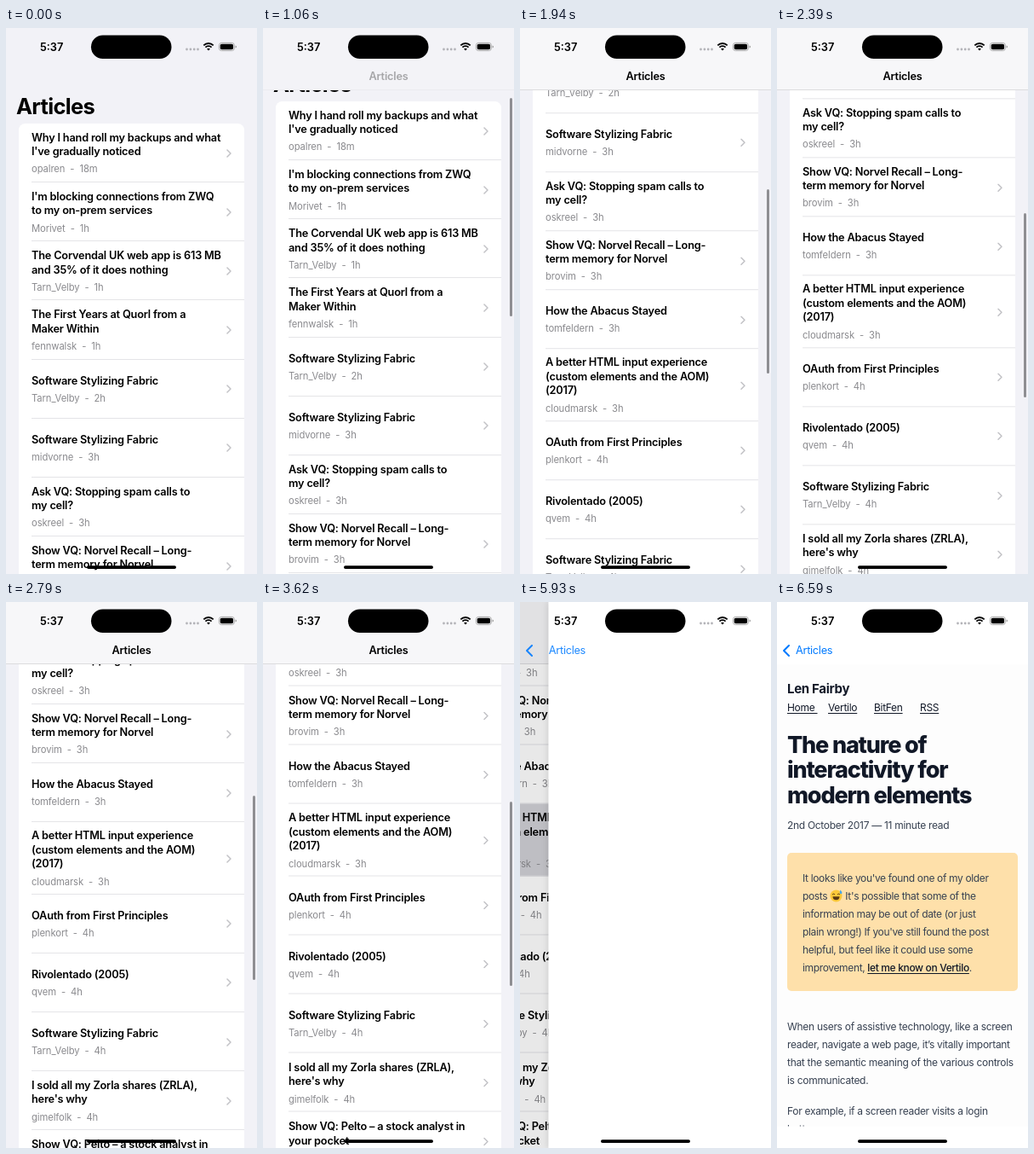
An HTML page that plays this animation: 295 px wide and 640 px high, repeating every 8 s.

```html
<!DOCTYPE html>
<html lang="en">
<head>
<meta charset="utf-8">
<title>Article reader</title>
<style>
html, body { margin: 0; width: 100%; height: 100%; overflow: hidden; background: #fff; }
body { font-family: Inter, "Liberation Sans", sans-serif; color: #000; }
#stage { position: relative; width: 295px; height: 640px; overflow: hidden; }
#stage div, #stage > svg { position: absolute; white-space: nowrap; }
.full { inset: 0; }

#home { background: #f2f2f7; }
#clip { clip-path: inset(73px 0 0); }
#large { left: 12px; top: 77px; font: 700 25.5px/30px Inter, sans-serif; letter-spacing: -.027em; }
#card { left: 15px; top: 112px; width: 265px; background: #fff; border-radius: 7.5px; overflow: hidden; }
#card .row {
  position: relative; box-sizing: border-box; height: 69.15px; padding: 1px 0 0 15px;
  display: flex; flex-direction: column; justify-content: center;
}
#card .tall { height: 84.5px; }
.row::after { content: ""; position: absolute; left: 15px; right: 0; bottom: 0; height: 1px; background: #e4e4e7; }
.row b { font: 600 12.75px/16.55px Inter, sans-serif; letter-spacing: -.2px; }
.row p {
  margin: 4.7px 0 0; display: flex; gap: 6px;
  font-size: 11.25px; line-height: 15px; letter-spacing: -.1px; color: #8a8a8e;
}
.row svg { position: absolute; left: 243px; top: calc(50% - 5px); }
#card .pressed { background: #d1d1d6; }
#bar { left: 0; top: 0; width: 295px; height: 73px; background: #f7f7f9; border-bottom: 1px solid #dcdcde; box-sizing: border-box; }
#thumb { left: 290.3px; width: 2.4px; border-radius: 2px; background: #8e8e92; }
#dim { background: #000; }

#page { background: #fff; box-shadow: 0 0 8px #0002; }
#web { clip-path: inset(73px 0 25.5px); background: #fdfdfd; color: #374151; font-size: 12px; letter-spacing: -.3px; }
#web u { color: #111827; text-underline-offset: 2px; }
#web .name { font-weight: 700; font-size: 15px; color: #111827; }
#web .head { font-weight: 800; font-size: 27px; letter-spacing: -.043em; color: #111827; }
#web .note { left: 12px; top: 294px; width: 271px; height: 162px; border-radius: 5px; background: #fee0aa; }
#web .old { letter-spacing: -.35px; }
#web .old u { font-weight: 500; }
#web .old svg { vertical-align: -3px; }

#title { left: 0; width: 295px; top: 47px; text-align: center; font: 600 12.75px/20px Inter, sans-serif; letter-spacing: -.2px; }
#label { left: 22px; top: 47px; font-size: 12.75px; line-height: 20px; letter-spacing: -.3px; color: #007aff; }
</style>
</head>
<body>
<div id="stage">
  <div id="home" class="full">
    <div id="clip" class="full">
      <div id="scroll" class="full">
        <div id="large">Articles</div>
        <div id="card"></div>
      </div>
    </div>
    <div id="bar"></div>
    <div id="thumb"></div>
    <div id="dim" class="full"></div>
  </div>
  <div id="page" class="full"><div id="web" class="full"></div></div>
  <div id="title">Articles</div>
  <div id="label">Articles</div>
  <svg id="arrow" width="295" height="80" fill="none" stroke="#007aff" stroke-width="2" stroke-linecap="round" stroke-linejoin="round"><path d="M14 51l-6 6 6 6"/></svg>
  <svg width="295" height="640">
    <rect x="100" y="8.5" width="94.5" height="27.5" rx="13.75"/>
    <text x="40" y="26.7" font-size="12.75" font-weight="600">5:37</text>
    <g fill="#b4b4b9"><circle cx="212.5" cy="25" r="1.4"/><circle cx="216.9" cy="25" r="1.4"/><circle cx="221.2" cy="25" r="1.4"/><circle cx="225.5" cy="25" r="1.4"/></g>
    <g fill="none" stroke="#000" stroke-width="1.8"><path d="M232.3 20.3a8.2 8.2 0 0 1 11.4 0M234.4 22.7a5.2 5.2 0 0 1 7.2 0"/></g>
    <path d="M238 26.6l-1.9-2a2.8 2.8 0 0 1 3.8 0z"/>
    <rect x="250.4" y="17.4" width="18" height="9.2" rx="3" fill="none" stroke="#999" stroke-width=".8"/>
    <rect x="251.7" y="18.7" width="15.4" height="6.6" rx="1.8"/>
    <path d="M269.6 20.4q1.4.4 1.4 1.6t-1.4 1.6z" fill="#999"/>
    <rect x="95" y="630.2" width="105" height="3.8" rx="1.9"/>
  </svg>
</div>
<script>
const $ = id => document.getElementById(id);
const LOOP = 8000, PRESS = 5440, PUSH = 5620, SETTLED = 6400, LOADED = 6590;

const articles = [
  ["Why I hand roll my backups and what|I've gradually noticed", "opalren", "18m"],
  ["I'm blocking connections from ZWQ|to my on-prem services", "Morivet", "1h"],
  ["The Corvendal UK web app is 613 MB|and 35% of it does nothing", "Tarn_Velby", "1h"],
  ["The First Years at Quorl from a|Maker Within", "fennwalsk", "1h"],
  ["Software Stylizing Fabric", "Tarn_Velby", "2h"],
  ["Software Stylizing Fabric", "midvorne", "3h"],
  ["Ask VQ: Stopping spam calls to|my cell?", "oskreel", "3h"],
  ["Show VQ: Norvel Recall – Long-|term memory for Norvel", "brovim", "3h"],
  ["How the Abacus Stayed", "tomfeldern", "3h"],
  ["A better HTML input experience|(custom elements and the AOM)|(2017)", "cloudmarsk", "3h"],
  ["OAuth from First Principles", "plenkort", "4h"],
  ["Rivolentado (2005)", "qvem", "4h"],
  ["Software Stylizing Fabric", "Tarn_Velby", "4h"],
  ["I sold all my Zorla shares (ZRLA),|here's why", "gimelfolk", "4h"],
  ["Show VQ: Pelto – a stock analyst in|your pocket", "wendrik", "4h"]
];
const lines = s => s.replaceAll("|", "<br>");
const chevron = `<svg width="8" height="10" fill="none" stroke="#c2c2c6" stroke-width="1.5" stroke-linecap="round" stroke-linejoin="round"><path d="M2 1l4 4-4 4"/></svg>`;

$("card").innerHTML = articles.map(([title, user, age]) => `
  <div class="row ${title.split("|").length > 2 ? "tall" : ""}">
    <b>${lines(title)}</b><p><span>${user}</span><span>-</span><span>${age}</span></p>
    ${title.startsWith("Ask") ? "" : chevron}
  </div>`).join("");
const chosen = document.querySelector(".tall");

const emoji = `<svg width="15" height="15" viewBox="0 0 15 15" fill="none" stroke="#5b3a12"><circle cx="7.5" cy="7.5" r="7" fill="#fcc93a" stroke="none"/><path d="M3 6l1.7-1L6 6M9 6l1.4-1L12 6"/><path d="M3.5 8.3h8a4 4 0 0 1-8 0z" fill="#5b3a12" stroke="none"/><path d="M12.6.6q3.4 4 .6 4.6-2.6-.5-.6-4.6z" fill="#48a8e8" stroke="none"/></svg>`;

// y is the middle of the first line
const text = (x, y, height, html, cls = "") =>
  `<div class="${cls}" style="left:${x}px;top:${y - height / 2}px;line-height:${height}px">${lines(html)}</div>`;

$("web").innerHTML = `<div class="note"></div>` +
  text(12, 102, 20, "Len Fairby", "name") +
  [["Home&nbsp;", 12], ["Vertilo", 60], ["BitFen", 114], ["RSS", 168]]
    .map(([s, x]) => text(x, 124, 20, `<u>${s}</u>`)).join("") +
  text(12, 167.5, 29.6, "The nature of|interactivity for|modern elements", "head") +
  text(12, 261.5, 20, "2nd October 2017 — 11 minute read") +
  text(30, 323, 21, `It looks like you've found one of my older|posts ${emoji} It's possible that some of the|information may be out of date (or just|plain wrong!) If you've still found the post|helpful, but feel like it could use some|improvement, <u>let me know on Vertilo</u>.`, "old") +
  text(12, 497, 21, "When users of assistive technology, like a screen|reader, navigate a web page, it’s vitally important|that the semantic meaning of the various controls|is communicated.") +
  text(12, 596.5, 21, "For example, if a screen reader visits a login|button,");

const clamp = v => Math.min(1, Math.max(0, v));

// Finger drag, flick, then exponential slowdown
function offset(t) {
  if (t < 1530) return 187.5 * clamp((t - 900) / 630) ** 1.45;
  if (t < 1640) return 187.5 + 51 * (t - 1530) / 110;
  return Math.min(497.5, 502.5 - 145 * Math.exp((1940 - t) / 500));
}

// Critically damped slide from 0 to 1
function pushed(t) {
  if (t >= SETTLED) return 1;
  const w = Math.max(0, t - PUSH) * .012;
  return 1 - (1 + w) * Math.exp(-w);
}

function draw(t) {
  const y = offset(t), p = pushed(t), collapsed = clamp((y - 20) / 19);
  $("scroll").style.transform = `translateY(${-y}px)`;
  $("bar").style.opacity = collapsed;
  $("thumb").style.opacity = clamp(y / 4);
  $("thumb").style.top = 73.5 + .3225 * y + "px";
  $("thumb").style.height = 216 + Math.max(0, 357 - y) * .12 + "px";
  chosen.classList.toggle("pressed", t >= PRESS);

  $("home").style.transform = `translateX(${-88 * p}px)`;
  $("dim").style.opacity = .1 * p;
  $("page").style.transform = `translateX(${295 * (1 - p)}px)`;
  $("page").style.visibility = p > 0 ? "visible" : "hidden";
  $("web").style.opacity = t >= LOADED ? 1 : 0;

  $("title").style.transform = `translateX(${-104.5 * p}px)`;
  $("title").style.opacity = collapsed * clamp(1 - 1.6 * p);
  $("label").style.transform = `translateX(${104.5 * (1 - p)}px)`;
  $("label").style.opacity = $("arrow").style.opacity = p;
}

const start = performance.now();
function tick() {
  draw((performance.now() - start) % LOOP);
  requestAnimationFrame(tick);
}
tick();
</script>
</body>
</html>
```
